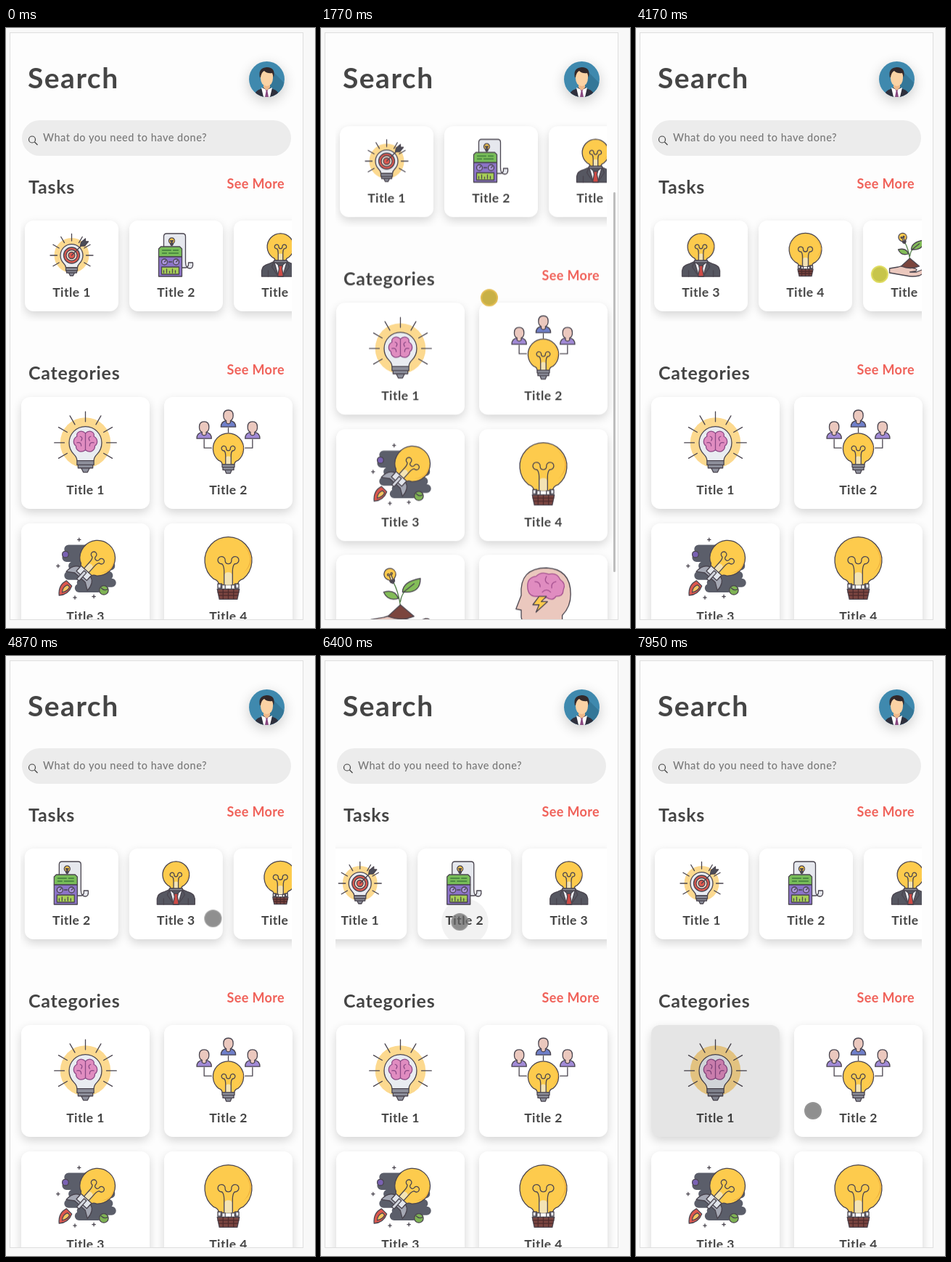
Recreate the animation shown at these times as an HTML page. Size 426 by 826 pixels, loop 8 s.

```html
<!DOCTYPE html>
<html lang="en">
<head>
<meta charset="utf-8">
<title>Task search</title>
<style>
html, body { margin: 0; width: 100%; height: 100%; overflow: hidden; background: #f8f8f8; }
#stage { position: relative; width: 426px; height: 826px; overflow: hidden; font-family: Lato, sans-serif; }
#stage div, #stage > svg, #content > svg { position: absolute; }
svg { display: block; overflow: visible; }
text { fill: #454545; font-weight: 700; letter-spacing: .025em; }
.title { font-size: 39px; letter-spacing: .038em; }
.link { fill: #f0625a; font-size: 18px; text-anchor: end; letter-spacing: .02em; }
.head { font-size: 25px; letter-spacing: .03em; }
.hint { fill: #777; font-size: 14.5px; font-weight: 500; letter-spacing: .035em; }
.name { font-size: 17.5px; text-anchor: middle; }

#panel { left: 5px; top: 6px; width: 403px; height: 807px; border: 1px solid #dedede; background: #fdfdfd; }
#avatar { left: 335px; top: 46px; width: 49px; height: 49px; border-radius: 50%; box-shadow: 0 5px 18px rgba(0,0,0,.2); }
#view { left: 6px; top: 124px; width: 403px; height: 690px; overflow: hidden; }
#content { left: -6px; top: -124px; width: 426px; height: 1040px; animation: scroll 8s infinite ease-in-out; }
#bar { left: 22px; top: 127px; width: 371px; height: 49px; border-radius: 25px; background: #ececec; }
#strip { left: 20px; top: 250px; width: 374px; height: 154px; overflow: hidden; }
#tasks { left: -20px; top: -250px; animation: swipe 8s infinite ease-in-out; }
#thumb { left: 403px; top: 128px; width: 3px; height: 523px; border-radius: 2px; background: #bdbdbd; animation: thumb 8s infinite ease-in-out; }

.card { border-radius: 12px; background: #fff; box-shadow: 0 5px 13px rgba(0,0,0,.16); overflow: hidden; }
.icon { stroke: #4a454f; stroke-width: 1.3; stroke-linejoin: round; stroke-linecap: round; }
.icon * { vector-effect: non-scaling-stroke; }
.ripple { position: absolute; border-radius: 50%; background: rgba(0,0,0,.1); animation: 8s var(--t) infinite backwards linear; }
.tap { animation-name: grow, tap; }
.hold { animation-name: grow, hold; }
.cut { animation-name: grow, cut; }
#cursor { left: -12px; top: -12px; width: 20px; height: 20px; border: 2px solid; border-radius: 50%; animation: move 8s infinite ease-in-out, tint 8s infinite linear; }

@keyframes scroll {
  0%, 8.6% { transform: none; }
  18.1%, 20% { transform: translateY(-216px); animation-timing-function: ease-in; }
  22.13% { transform: translateY(-130px); animation-timing-function: ease-out; }
  28.5%, 100% { transform: none; }
}
@keyframes thumb {
  0%, 8.5% { transform: none; opacity: 0; }
  8.6% { transform: none; opacity: 1; }
  18.1%, 20% { transform: translateY(163px); animation-timing-function: ease-in; }
  22.13% { transform: translateY(98px); animation-timing-function: ease-out; }
  28.5%, 32% { transform: none; opacity: 1; }
  34.5%, 100% { transform: none; opacity: 0; }
}
@keyframes swipe {
  0%, 36.9% { transform: none; }
  39.8% { transform: translateX(-150px); }
  41.6%, 45% { transform: translateX(-144px); }
  48.1% { transform: translateX(-300px); }
  52.1% { transform: translateX(-289px); }
  52.8%, 55% { transform: translateX(-288px); }
  58.7% { transform: translateX(-150px); }
  61.2%, 65% { transform: translateX(-144px); }
  67.8% { transform: translateX(-324px); }
  69.5% { transform: translateX(-292px); }
  70.5%, 71.5% { transform: translateX(-288px); }
  74.4% { transform: translateX(-150px); }
  76%, 78.4% { transform: translateX(-144px); animation-timing-function: linear; }
  80% { transform: translateX(-37px); animation-timing-function: ease-out; }
  83%, 100% { transform: none; }
}
@keyframes move {
  0%, 1.74% { transform: translate(299px, 648px); opacity: 0; }
  1.75% { transform: translate(299px, 648px); opacity: 1; }
  3.6%, 8.6% { transform: translate(287px, 508px); }
  18.1% { transform: translate(250px, 288px); }
  19.2%, 20% { transform: translate(250px, 293px); animation-timing-function: ease-in; }
  22.13% { transform: translate(232px, 371px); animation-timing-function: ease-out; }
  28.5% { transform: translate(226px, 512px); }
  35.6%, 36.9% { transform: translate(323px, 349px); }
  39.8% { transform: translate(172px, 349px); }
  44%, 45% { transform: translate(399px, 350px); }
  48.1% { transform: translate(240px, 352px); }
  52.1% { transform: translate(336px, 339px); }
  54.5%, 55% { transform: translate(100px, 345px); }
  58.7% { transform: translate(238px, 350px); }
  63%, 65% { transform: translate(330px, 372px); }
  67.8%, 69.6% { transform: translate(150px, 372px); }
  71%, 71.5% { transform: translate(80px, 370px); }
  74.4% { transform: translate(218px, 368px); }
  77%, 78.4% { transform: translate(86px, 366px); animation-timing-function: linear; }
  80% { transform: translate(191px, 366px); animation-timing-function: ease-out; }
  82.5% { transform: translate(226px, 368px); }
  85.5%, 86% { transform: translate(100px, 376px); }
  89.5%, 92% { transform: translate(246px, 386px); }
  93.7% { transform: translate(110px, 625px); }
  98.5%, 100% { transform: translate(244px, 626px); opacity: 1; }
}
@keyframes tint {
  0%, 19%, 26%, 53% { background: #c7c54b; border-color: #dedb5f; }
  20%, 24% { background: #c8b046; border-color: #e2bd53; }
  54%, 100% { background: rgba(100,100,100,.72); border-color: rgba(150,150,150,.72); }
}
@keyframes grow {
  0% { transform: scale(0); animation-timing-function: cubic-bezier(.4,0,.2,1); }
  5.6%, 100% { transform: none; }
}
@keyframes tap { 0% { opacity: .35; } 2.6% { opacity: .7; } 5.2%, 100% { opacity: 0; } }
@keyframes hold { 0% { opacity: .35; } 4%, 6.6% { opacity: 1; } 10%, 100% { opacity: 0; } }
@keyframes cut { 0% { opacity: .35; } 4%, 6.24% { opacity: 1; } 6.25%, 100% { opacity: 0; } }
</style>
</head>
<body>
<div id="stage">
  <div id="panel"></div>
  <svg width="426" height="120"><text class="title" x="30" y="83">Search</text></svg>
  <div id="avatar">
    <svg width="49" height="49" viewBox="0 0 49 49">
      <defs><clipPath id="round"><circle cx="24.5" cy="24.5" r="24.5"/></clipPath></defs>
      <g clip-path="url(#round)">
        <path fill="#3f89ae" d="M0 0h49v49H0z"/>
        <path fill="#347798" d="M33 14 49 30V49H25z"/>
        <path fill="#2f303d" d="M7 49q1-9 9-11l4-2h9l4 2q8 2 9 11z"/>
        <path fill="#fff" d="M17 36l7.5 3 7.500-3-3 13h-9z"/>
        <path fill="#8b4a82" d="M22.5 38h4l-1 3 1.500 8h-5l1.500-8z"/>
        <path fill="#efb98a" d="M20 29h9v7l-4.500 4-4.500-4z"/>
        <path fill="#fbd2a4" d="M16 16q0-5 8.500-5T33 16v7q0 10-8.500 11Q16 33 16 23z"/>
        <path fill="#33292b" d="M15 22q-3-13 9.500-14Q37 8 34 22l-2-6q-7 1-11-3-4 2-5 9z"/>
      </g>
    </svg>
  </div>
  <div id="view">
    <div id="content">
      <div id="bar"></div>
      <div id="strip"><div id="tasks"></div></div>
      <div id="grid"></div>
      <svg width="426" height="500">
        <g fill="none" stroke="#444" stroke-width="1.2"><circle cx="36" cy="153.5" r="4.5"/><path d="M39.500 157l4 4"/></g>
        <text class="hint" x="51" y="156">What do you need to have done?</text>
        <text class="head" x="31" y="228">Tasks</text>
        <text class="link" x="384" y="221">See More</text>
        <text class="head" x="31" y="484">Categories</text>
        <text class="link" x="384" y="477">See More</text>
      </svg>
    </div>
  </div>
  <div id="thumb"></div>
  <div id="cursor"></div>
</div>
<script>
const path = (d, fill = 'none', more = '') => `<path d="${d}" fill="${fill}" ${more}/>`;
const disc = (x, y, r, fill, more = '') => `<circle cx="${x}" cy="${y}" r="${r}" fill="${fill}" ${more}/>`;
const bare = 'stroke="none"';
const yellow = '#fdcb4d', grey = '#8d8f9b', skin = '#ebc8be', pink = '#e08cc0';

const socket = path('M21 46h18v4H21zM22 50h16v4H22zM25 54h10l-2 5h-6z', grey);

// Yellow bulb centred on x, y; extra parts share its rotated frame.
const bulb = (x, y, size, turn = 0, extra = '') =>
  `<g transform="translate(${x} ${y}) rotate(${turn}) scale(${size}) translate(-30 -22.8)">` +
  path('M21 46Q21 42 16 40.3A22.4 22.4 0 1 1 44 40.3Q39 42 39 46z', yellow) +
  path('M44 8q13 14 0 27 16-13 0-27', '#f1b43f', bare) +
  path('M26 46V38q0-4 4-4t4 4v8z', '#f3e3b4', bare) +
  path('M26 46V33q0-5-2-7a3.500 3.500 0 1 1 3-3q0 3 3 3t3-3a3.500 3.500 0 1 1 3 3q-2 2-2 7v13') +
  extra + '</g>';

const rays = () => {
  let d = '';
  for (let i = 0; i < 9; i++) {
    const a = (150 + 30 * i) * Math.PI / 180;
    d += `M${30 + 20 * Math.cos(a)} ${31 + 20 * Math.sin(a)}L${30 + 29.5 * Math.cos(a)} ${31 + 29.5 * Math.sin(a)}`;
  }
  return path(d);
};

const lamp = inner => disc(30, 31, 24, '#fcd98f', bare) + rays() +
  path('M22 48q0-3-3-6a15.500 15.500 0 1 1 22 0q-3 3-3 6z', '#e9ecf1') + inner +
  path('M22 48h16v4H22zM23 52h14v3H23zM26 55h8l-2 4h-4z', grey);

const brain = path('M30 22c-4-4-9-1-8 3-4 2-4 7-1 9 0 5 5 7 9 4 4 3 9 1 9-4 3-2 3-7-1-9 1-4-4-7-8-3z', pink, 'stroke="#8c4a86"') +
  path('M30 22v16M25 25q3 1 1 4M35 25q-3 1-1 4M22 31q4-1 4 3M38 31q-4-1-4 3', 'none', 'stroke="#8c4a86"');

const person = (x, y, fill) => `<g transform="translate(${x} ${y})">` +
  path('M-7 11q0-5 5-6h4q5 1 5 6z', fill) +
  path('M-4.600 0q0-5 4.600-5t4.600 5q0 4-2.600 5v2q-2 2-4 0V5q-2.600-1-2.600-5z', skin) + '</g>';

const spark = (x, y) => path(`M${x} ${y - 1.5}v3M${x - 1.5} ${y}h3`);

const icons = {
  target: lamp(disc(30, 31, 11, '#df594f') + disc(30, 31, 7.5, '#f5e3d3') + disc(30, 31, 4.5, '#df594f') +
    path('M30 31 44 17') + path('M42 18l1-5 6-5v4h4l-5 6z', '#4b4c57')),
  machine: path('M13 20V5q0-4 4-4h22q4 0 4 4v35q0 9 6 9 5 0 4-8h-6v3q-1 4-4 4H22z', '#e6e8ee') +
    bulb(24, 11, .18, 0, socket) +
    path('M6 22l3-3h26l3 3v11H6z', '#78bd59') + path('M11 24h12m3 0h7M11 28h6m3 0h13', 'none', 'stroke="#3f7a3c"') +
    path('M6 33h32v27H6z', '#8c73c8') + disc(14, 40, 4, '#ab95dc') + disc(30, 40, 4, '#ab95dc') +
    path('M14 40l2-2M30 40l2-2M20 40h4') + path('M10 47h24v10H10z', '#a7cf57') +
    path('M13 55v-3m4 3v-5m4 5v-2m4 2v-5m4 5v-3'),
  boss: path('M4 60V52q1-7 9-9l9-4h16l9 4q8 2 9 9v8z', '#565761') +
    path('M21 39l9 8 9-8-6 21h-6z', '#eef0f4') + path('M27 45h6l-1 4 2 11h-8l2-11z', '#cf4a45') +
    path('M21 39l-3 8 9 13M39 39l3 8-9 13M13 52v8M47 52v8') + bulb(30, 19.2, .82) + path('M21 38h18v3H21z', grey),
  balloon: bulb(30, 22.8, 1) + path('M20 45h4v4h-4zM36 45h4v4h-4z', '#e6e8ee') + path('M23 46v4M37 46v4M27 46v4M33 46v4') +
    path('M19.500 50h21l-2 9.500h-17z', '#7b4540') + path('M20 53h20M21 56h18M25 50v9M30 50v9M35 50v9', 'none', 'stroke="#4d2b2c"'),
  plant: path('M30 36Q28 22 23 13M30 32q1-8 6-11M28 28l-3-2', 'none', 'stroke="#4d7a43"') +
    bulb(20, 6, .25, -20, socket) + path('M32 23q0-10 17-13 0 13-13 13z', '#83bd58') + path('M33 23l10-8') +
    path('M28 29q-10 3-14-6 11-3 14 6z', '#83bd58') +
    path('M2 55V49l12-2q8-3 13 0l10 2q5 2 0 4l-7 1h9l15-6q5 0 3 3L43 59q-10 2-18 0z', skin) +
    path('M30 35l13 11q-12 5-25 0z', '#7b453e'),
  mind: lamp(brain),
  team: path('M7 28v8h7M53 28v8h-7M30 17v4') + person(30, 5, '#6f7fc9') + person(7, 16, '#a18ad6') +
    person(53, 16, '#a18ad6') + bulb(30, 36.5, .65, 0, socket),
  rocket: path('M14 12h20M12 20h20M18 28h36M14 37h38M26 44h29M24 49h18', 'none', 'stroke="#5b5e6a" stroke-width="12"') +
    bulb(41.5, 20.5, .75, 42, path('M21 44h18v12H21z', '#e2e5eb') +
      path('M21 46q-9 3-9 16l9-6h18l9 6q0-13-9-16v7H21z', '#a5a8b4') + path('M28 46h4v14h-4z', '#d3d6de')) +
    path('M5 56q-1-10 7-14l5 5q-3 8-12 9z', '#dd574e') + path('M8 53q0-5 5-7l2 2q-2 4-7 5z', '#f6c460') +
    disc(11, 17, 3, '#7a62b4') + disc(47.5, 51, 4.3, '#7fb354') + path('M45 49q3 3 6 1') +
    spark(4, 28) + spark(20, 58) + spark(38, 57) + spark(24, 3),
  head: path('M17 60v-9q-8 1-8-5v-6l-5-1 5-13Q7 0 33 0q23 1 23 25 0 12-8 20v15z', skin) +
    path('M15 17q0-8 8-9 5-5 12-2 8-2 11 5 6 4 3 10 0 6-7 6-3 5-9 1-5 3-8-1-10 1-10-10z', pink, 'stroke="#a4508f"') +
    path('M22 13q5 0 5 5M33 8q-3 5 2 7M42 13q-5 1-4 6M29 23q4-4 8 0', 'none', 'stroke="#a4508f"') +
    path('M26 27l-6 8h6l-3 7 11-10h-6l5-5z', yellow),
};

const taskSize = { w: 129, h: 125, icon: 60, top: 17, base: 105 };
const gridSize = { w: 177, h: 154, icon: 87, top: 18, base: 134 };

function addCard(parent, size, x, y, icon, label) {
  const { w, h, top, base } = size, mid = w / 2, s = size.icon;
  const card = document.createElement('div');
  card.className = 'card';
  card.style.cssText = `left:${x}px;top:${y}px;width:${w}px;height:${h}px`;
  card.innerHTML = `<svg width="${w}" height="${h}">` +
    `<svg class="icon" x="${mid - s / 2}" y="${top}" width="${s}" height="${s}" viewBox="0 0 60 60">${icons[icon]}</svg>` +
    `<text class="name" x="${mid}" y="${base}">${label}</text></svg>`;
  document.getElementById(parent).append(card);
  return card;
}

const tasks = ['target', 'machine', 'boss', 'balloon', 'plant', 'head']
  .map((icon, i) => addCard('tasks', taskSize, 26 + 144 * i, 265, icon, `Title ${i + 1}`));
const groups = ['mind', 'team', 'rocket', 'balloon', 'plant', 'head']
  .map((icon, i) => addCard('grid', gridSize, 21 + 196.5 * (i % 2), 508 + 173.7 * (i >> 1), icon, `Title ${i + 1}`));

function addRipple(card, kind, time, x, y) {
  const w = parseFloat(card.style.width), h = parseFloat(card.style.height);
  const r = Math.hypot(Math.max(x, w - x), Math.max(y, h - y)) + 20;
  const dot = document.createElement('i');
  dot.className = `ripple ${kind}`;
  dot.style.cssText = `left:${x - r}px;top:${y - r}px;width:${2 * r}px;height:${2 * r}px;--t:${time}ms`;
  card.append(dot);
}

addRipple(tasks[2], 'tap', 4400, 74, 80);
addRipple(tasks[3], 'hold', 5150, 16, 107);
addRipple(tasks[2], 'tap', 5720, 54, 105);
addRipple(tasks[1], 'tap', 6290, 65, 101);
addRipple(tasks[0], 'hold', 6880, 74, 111);
addRipple(groups[0], 'cut', 7500, 89, 117);
</script>
</body>
</html>
```
